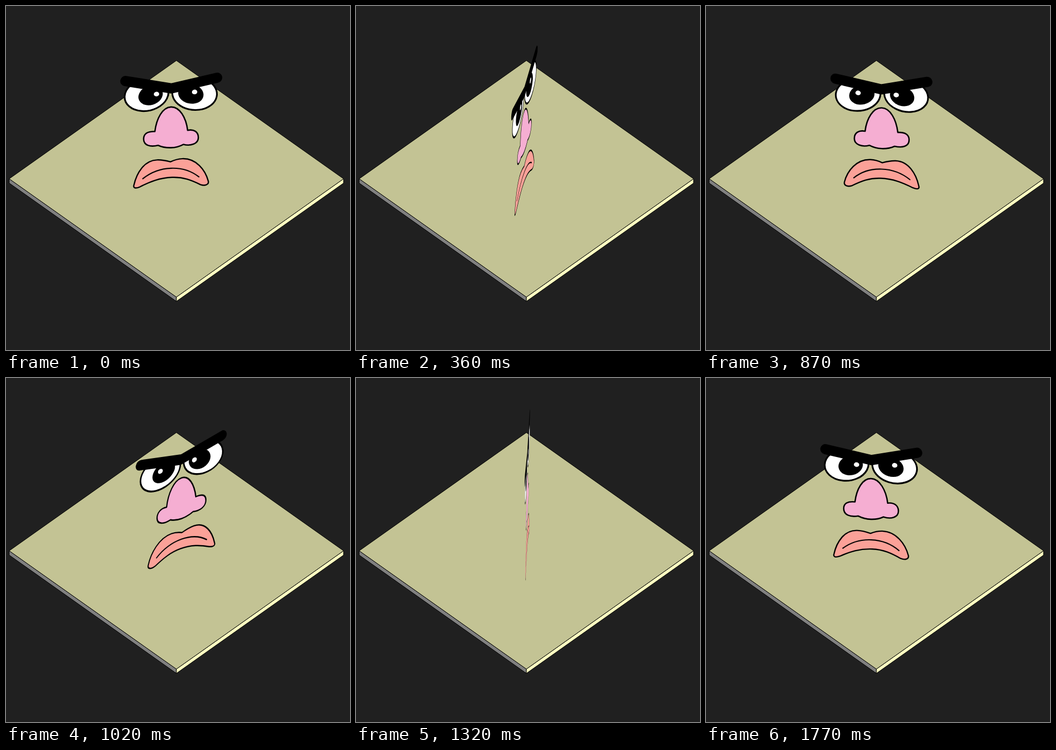
Write an HTML page without scripts that moves like this. It is 640 px wide and 640 px high and loops after 1.8 s.

```html
<!DOCTYPE html>
<html lang="en">
<head>
<meta charset="utf-8">
<title>Turning face</title>
<style>
  @property --turn {
    syntax: "<angle>";
    inherits: false;
    initial-value: 3deg;
  }
  html, body { margin: 0; height: 100%; overflow: hidden; background: #202020; }
  svg { display: block; width: 100vw; height: 100vh; }
  .floor { stroke: #000; stroke-width: 1; stroke-linejoin: round; }
  /* A flat upright card seen from 45 degrees above, turning on a vertical axis just in front of it */
  .face {
    transform-origin: 317px 0;
    transform: matrix(
      cos(var(--turn)), calc(-0.7071 * sin(var(--turn))), 0, 1,
      calc(-1.2 * sin(var(--turn))), calc(0.85 - 0.85 * cos(var(--turn))));
    animation: turn 1.8s steps(60, end) infinite;
    stroke: #000;
    stroke-linecap: round;
    stroke-linejoin: round;
  }
  .eye { fill: #fff; stroke-width: 3.2; }
  .pupil { stroke: none; }
  .glint { fill: #fff; stroke: none; }
  .brow { fill: none; stroke-width: 19; }
  .nose { fill: #f5aed2; stroke-width: 2.6; }
  .mouth { fill: #fba198; stroke-width: 2.4; }
  .lips { fill: none; stroke-width: 2.2; }
  @keyframes turn {
    from { --turn: 3deg; }
    to { --turn: 363deg; }
  }
</style>
</head>
<body>
<svg viewBox="0 0 640 640">
  <g class="floor">
    <path fill="#808080" d="M6 321.5L317 541.5V549.5L6 329.5Z"/>
    <path fill="#ffffc1" d="M628 321.5L317 541.5V549.5L628 329.5Z"/>
    <path fill="#c3c394" d="M317 101.5L628 321.5L317 541.5L6 321.5Z"/>
  </g>
  <g class="face">
    <path class="eye" d="M231.3 144.7A41 30 -8 1 0 300.3 151.3Z"/>
    <path class="eye" d="M311.4 152A41.8 30.6 8 1 0 381.9 145.4Z"/>
    <ellipse class="pupil" cx="269" cy="164.5" rx="23" ry="18" transform="rotate(-15 269 164.5)"/>
    <ellipse class="pupil" cx="344" cy="164.5" rx="24" ry="18" transform="rotate(15 344 164.5)"/>
    <ellipse class="glint" cx="280" cy="162.5" rx="5" ry="4.4"/>
    <ellipse class="glint" cx="351" cy="161.2" rx="5" ry="4.4"/>
    <path class="brow" d="M222 136L308 153L393 136.3"/>
    <path class="nose" d="M277 232C280 208 291 187.5 307 187.5C323 187.5 335 208 338 232C350 230 358 236 358 246C358 258 344 262 330 258C316 265 298 265 283 258C268 261 256 257 256 245C256 235 264 231 277 232Z"/>
    <path class="mouth" d="M238 330C243 308 257 285 281 285C291 285 298 287 306 289.5C314 286 320 284.5 328 284.5C354 284.5 371 307 376.5 328C378 335 370 337 362 334C345 325 330 318.5 309 318.5C286 318.5 268 325 249 334C241 337 236 336 238 330Z"/>
    <path class="lips" d="M254.5 319C285 295.5 330 295.5 359 319.5"/>
  </g>
</svg>
</body>
</html>
```
